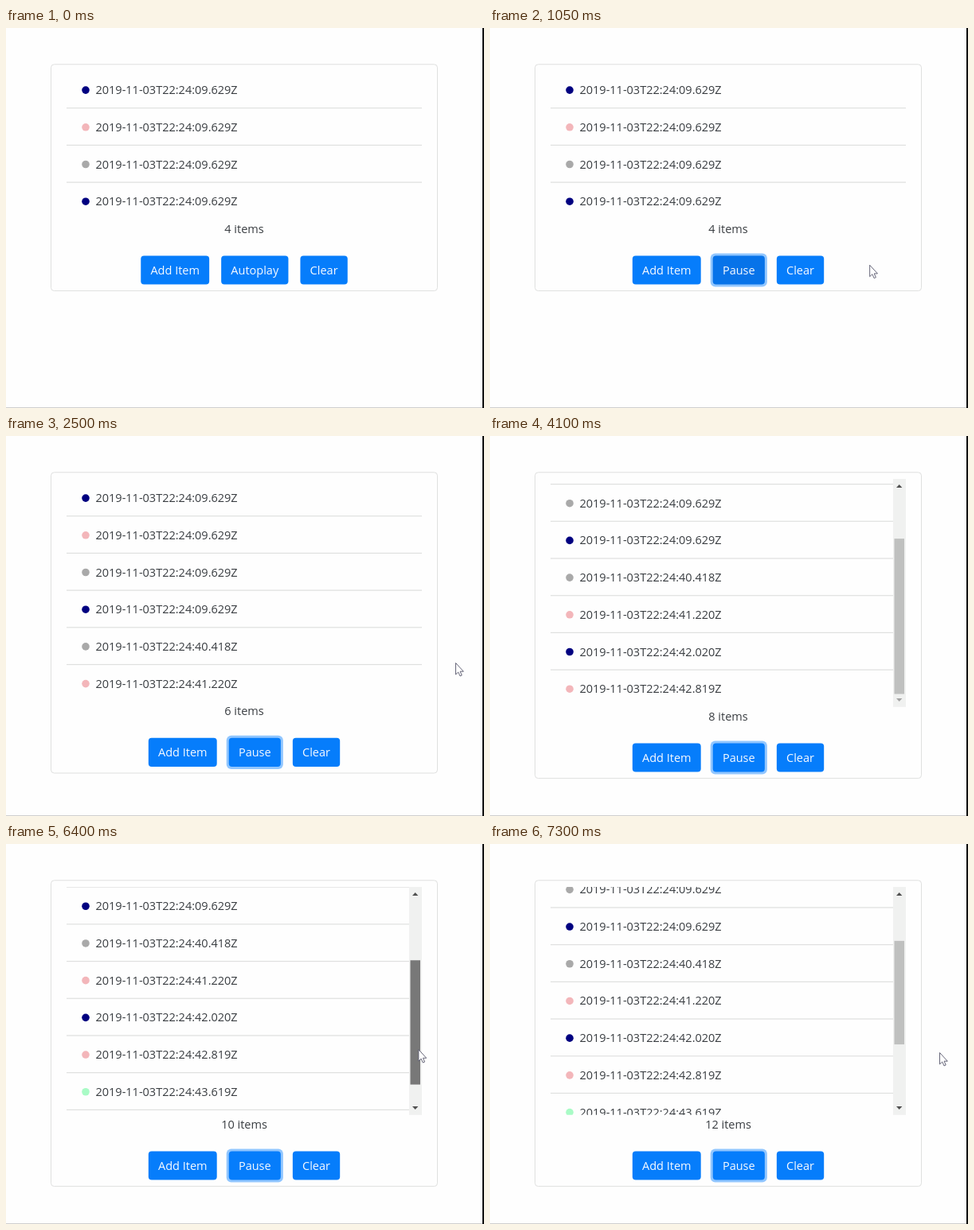
Recreate the animation shown at these times as an HTML page with a canvas. Size 600 by 478 pixels, loop 8 s.

```html
<!DOCTYPE html>
<html lang="en">
<head>
<meta charset="utf-8">
<title>Item list</title>
<style>
html, body { margin: 0; width: 100%; height: 100%; overflow: hidden; background: #fefefe; }
canvas { display: block; }
</style>
</head>
<body>
<canvas id="stage" width="600" height="478"></canvas>
<script>
const ctx = document.getElementById('stage').getContext('2d');
const LOOP = 8000, STEP = 50;
const FONT = '14.5px "Open Sans", "Noto Sans", sans-serif';
const INK = '#383c40', LINE = '#dfe0df';
const CENTER = 299, TOP = 54, ROW = 46.7, VIEW = 286.8;
const TRACK_TOP = 70, TRACK = 254.5;
const CLICK = 900, INTERVAL = 800, INITIAL = 4;
const GRAB = 6250, RELEASE = 6700;

const navy = '#000080', pink = '#f3b6ba', gray = '#a9a9a9', mint = '#a9fbc6', lilac = '#deb6fc';
const colors = [navy, pink, gray, navy, gray, pink, navy, pink, mint, lilac, gray, navy];
const added = ['40.418', '41.220', '42.020', '42.819', '43.619', '44.419', '45.219', '46.019'];

// The pointer visits the window twice: first to press the button, then to drag the scrollbar.
const key = (t, x, y) => ({ t, x, y });
const buttonVisit = [key(450, 560, 296), key(750, 320, 315), key(950, 320, 315),
  key(1200, 564, 288), key(1450, 564, 288), key(1650, 564, 285)];
const dragVisit = [key(5950, 549, 296), key(6150, 518, 280), key(GRAB, 518, 280),
  key(6650, 517, 244), key(RELEASE, 517, 244), key(6900, 587, 250), key(7150, 564, 262)];

const clamp = v => Math.max(0, Math.min(1, v));
const ramp = (t, from, length) => clamp((t - from) / length);
const easeOut = p => 1 - (1 - p) ** 2;
const lerp = (a, b, p) => a + (b - a) * p;

function along(path, t) {
  const i = path.findIndex(k => k.t > t);
  if (i < 0) return path[path.length - 1];
  const a = path[i - 1], b = path[i];
  const p = easeOut(ramp(t, a.t, b.t - a.t));
  return { x: lerp(a.x, b.x, p), y: lerp(a.y, b.y, p) };
}

function pointerAt(t) {
  if (t >= 450 && t < 3650) return along(buttonVisit, t);
  if (t >= 5950) return along(dragVisit, t);
  return null;
}

function scrollAt(t, height) {
  if (t < GRAB) return Math.max(0, height - VIEW);
  const grabbed = 10 * ROW;
  const moved = 280 - along(dragVisit, Math.min(t, RELEASE)).y;
  return grabbed - VIEW - moved * grabbed / TRACK;
}

function text(s, x, y, color = INK, align = 'left') {
  ctx.fillStyle = color;
  ctx.textAlign = align;
  ctx.fillText(s, x, y);
}

function box(x, y, w, h, r, color) {
  ctx.fillStyle = color;
  ctx.beginPath();
  ctx.roundRect(x, y, w, h, r);
  ctx.fill();
}

function arrow(y, dir, color) {
  ctx.fillStyle = color;
  ctx.beginPath();
  ctx.moveTo(510, y - 2 * dir);
  ctx.lineTo(513.7, y + 2 * dir);
  ctx.lineTo(517.4, y - 2 * dir);
  ctx.fill();
}

function drawRows(count, scroll, right) {
  ctx.save();
  ctx.beginPath();
  ctx.rect(70, TOP, 460, VIEW);
  ctx.clip();
  for (let i = 0; i < count; i++) {
    const y = TOP + ROW * i - scroll;
    const time = i < INITIAL ? '09.629' : added[i - INITIAL];
    ctx.fillStyle = colors[i];
    ctx.beginPath();
    ctx.arc(100, y + 24.1, 4.8, 0, Math.PI * 2);
    ctx.fill();
    text(`2019-11-03T22:24:${time}Z`, 112.5, y + 29.1);
    if (i < count - 1) {
      ctx.fillStyle = LINE;
      ctx.fillRect(76, y + ROW - 0.6, right - 76, 1.2);
    }
  }
  ctx.restore();
}

function drawScrollbar(t, height, scroll) {
  ctx.fillStyle = '#f0f1f0';
  ctx.fillRect(506, TOP, 16, VIEW);
  const dragging = t > GRAB && t < RELEASE;
  const hover = t >= 6100 && t < RELEASE + 50;
  ctx.fillStyle = dragging ? '#787878' : hover ? '#a8a8a8' : '#bfc0bf';
  ctx.fillRect(507.5, TRACK_TOP + scroll * TRACK / height, 12.5, VIEW * TRACK / height);
  const atEnd = scroll >= height - VIEW - 0.5;
  arrow(63, -1, '#505050');
  arrow(332, 1, atEnd ? '#a3a3a3' : '#505050');
}

function drawButtons(t, bottom) {
  const gap = 15, pad = 12.2, h = 36.2, y = bottom + 45.6;
  const labels = ['Add Item', t < CLICK ? 'Autoplay' : 'Pause', 'Clear'];
  const widths = labels.map(s => ctx.measureText(s).width + 2 * pad);
  const hover = ramp(t, 650, 150) * (1 - ramp(t, 950, 200));
  const ring = ramp(t, 800, 150);
  let x = CENTER - (widths[0] + widths[1] + widths[2]) / 2 - gap;
  labels.forEach((label, i) => {
    const w = widths[i], toggle = i === 1;
    if (toggle) box(x - 3, y - 3, w + 6, h + 6, 6, `rgba(38,143,255,${0.5 * ring})`);
    box(x, y, w, h, 4, '#067dfb');
    if (toggle) box(x, y, w, h, 4, `rgba(10,85,180,${0.5 * hover})`);
    text(label, x + w / 2, bottom + 69.2, '#f8fbff', 'center');
    x += w + gap;
  });
}

function drawPointer({ x, y }) {
  const shape = new Path2D('M0 0V14.5L3.2 11.5 5.5 16.5 7.7 15.5 5.6 10.7H9.8Z');
  ctx.save();
  ctx.translate(x + 0.5, y + 0.5);
  ctx.fillStyle = '#fff';
  ctx.fill(shape);
  ctx.strokeStyle = '#55556a';
  ctx.lineWidth = 0.9;
  ctx.stroke(shape);
  ctx.restore();
}

function draw(t) {
  const count = INITIAL + Math.max(0, Math.floor((t - CLICK) / INTERVAL));
  const height = count * ROW;
  const overflow = height > VIEW;
  const bottom = TOP + Math.min(height, VIEW);
  const scroll = scrollAt(t, height);
  const pointer = pointerAt(t);

  ctx.fillStyle = '#fefefe';
  ctx.fillRect(0, 0, 600, 478);
  ctx.fillStyle = '#cfcfcf';
  ctx.fillRect(0, 477, 598, 1);
  ctx.fillStyle = '#000';
  ctx.fillRect(598, 0, 2, 478);

  ctx.font = FONT;
  ctx.strokeStyle = LINE;
  ctx.lineWidth = 1;
  ctx.beginPath();
  ctx.roundRect(56.5, 45.8, 485, bottom + 44, 4);
  ctx.stroke();

  drawRows(count, scroll, overflow ? 506 : 522);
  if (overflow) drawScrollbar(t, height, scroll);
  text(`${count} items`, CENTER, bottom + 17, INK, 'center');
  drawButtons(t, bottom);
  if (pointer) drawPointer(pointer);
}

const start = performance.now();
function tick() {
  const t = (performance.now() - start) % LOOP;
  draw(Math.floor(t / STEP) * STEP);
  requestAnimationFrame(tick);
}
tick();
</script>
</body>
</html>
```
